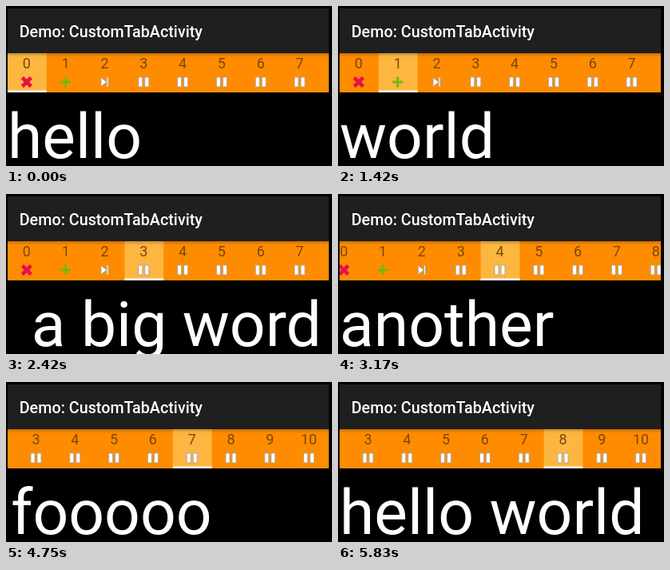
Write an HTML page with a canvas that moves like this. It is 408 px wide and 200 px high and loops after 5.91 s.

```html
<!DOCTYPE html>
<html lang="en">
<head>
<meta charset="utf-8">
<title>Custom tabs</title>
<style>
  html, body { margin: 0; width: 100%; height: 100%; overflow: hidden; background: #000; }
  canvas { display: block; }
</style>
</head>
<body>
<canvas id="stage" width="408" height="200"></canvas>
<script>
const ctx = document.getElementById('stage').getContext('2d');
const LOOP = 5910, LEFT = 2, VIEW = 402, TAB = 48.8, TABS = 11;
const pages = ['hello', 'world', 'foo', 'a big word', 'another', 'bar', 'foo', 'fooooo', 'hello world'];
// Each swipe advances one page: [start, duration] in ms
const swipes = [[800, 500], [1460, 450], [2000, 505], [2660, 460], [3400, 460],
                [3930, 420], [4390, 384], [5100, 500]];

const clamp = (v, lo, hi) => Math.min(hi, Math.max(lo, v));
const smooth = t => t * t * (3 - 2 * t);

// Position in pages; the tab strip runs slightly ahead of the pager
const position = (time, pace) => swipes.reduce(
  (sum, [start, span]) => sum + smooth(clamp((time - start) / (span * pace), 0, 1)), 0);

function box(color, x, y, w, h) {
  ctx.fillStyle = color;
  ctx.fillRect(x, y, w, h);
}

function label(text, x, y, font, color, align = 'left') {
  ctx.font = font + ' Roboto, sans-serif';
  ctx.fillStyle = color;
  ctx.textAlign = align;
  ctx.fillText(text, x, y);
}

function stroke(color, width, ...lines) {
  ctx.strokeStyle = color;
  ctx.lineWidth = width;
  ctx.beginPath();
  for (const [x1, y1, x2, y2] of lines) {
    ctx.moveTo(x1, y1);
    ctx.lineTo(x2, y2);
  }
  ctx.stroke();
}

// White shape with a thin grey rim
function rimmed(...points) {
  ctx.beginPath();
  for (const [x, y] of points) ctx.lineTo(x, y);
  ctx.closePath();
  ctx.fillStyle = '#fff';
  ctx.fill();
  ctx.strokeStyle = '#b0a498';
  ctx.lineWidth = 1;
  ctx.stroke();
}

const bar = (x, w) => rimmed([x, -6], [x + w, -6], [x + w, 6], [x, 6]);

function icon(index, x, y) {
  ctx.save();
  ctx.translate(x, y);
  if (index === 0) {
    stroke('#e8104c', 4.6, [-5.5, -5.5, 5.5, 5.5], [-5.5, 5.5, 5.5, -5.5]);
  } else if (index === 1) {
    stroke('#72b80c', 3, [-6.5, 0, 6.5, 0], [0, -6.5, 0, 6.5]);
  } else if (index === 2) {
    bar(2.5, 2);
    rimmed([-4.5, -5.5], [2.5, 0], [-4.5, 5.5]);
  } else {
    bar(-6.5, 5);
    bar(1.5, 5);
  }
  ctx.restore();
}

function drawTabs(time) {
  const active = position(time, .75);
  const selected = Math.round(active);
  const scroll = clamp(active * TAB - (VIEW - TAB) / 2, 0, TABS * TAB - VIEW);
  const tabX = i => LEFT + i * TAB - scroll;
  box('#ff8c00', LEFT, 59, VIEW, 49);
  box('#fdb640', tabX(selected), 59, TAB, 49);
  const shadow = ctx.createLinearGradient(0, 59, 0, 64);
  shadow.addColorStop(0, 'rgba(0,0,0,.2)');
  shadow.addColorStop(1, 'rgba(0,0,0,0)');
  box(shadow, LEFT, 59, VIEW, 5);
  for (let i = 0; i < TABS; i++) {
    const center = tabX(i) + TAB / 2 - .5;
    label(i, center, 78, '18px', '#7b4708', 'center');
    icon(i, center, 95);
  }
  box('#fff', tabX(active), 105.5, TAB, 2.5);
}

function drawPages(time) {
  const current = position(time, 1);
  pages.forEach((text, i) => {
    const x = (i - current) * VIEW;
    if (Math.abs(x) < VIEW) label(text, x + LEFT, 190, '78.6px', '#fff');
  });
}

function draw(time) {
  box('#000', 0, 0, 408, 200);
  box('#1f1f1f', LEFT, 3, VIEW, 56);
  label('Demo: CustomTabActivity', 16.7, 39, '500 19.75px', '#fff');
  ctx.save();
  ctx.beginPath();
  ctx.rect(LEFT, 59, VIEW, 141);
  ctx.clip();
  drawTabs(time);
  drawPages(time);
  ctx.restore();
}

const origin = performance.now();
function frame() {
  draw((performance.now() - origin) % LOOP);
  requestAnimationFrame(frame);
}
frame();
</script>
</body>
</html>
```
